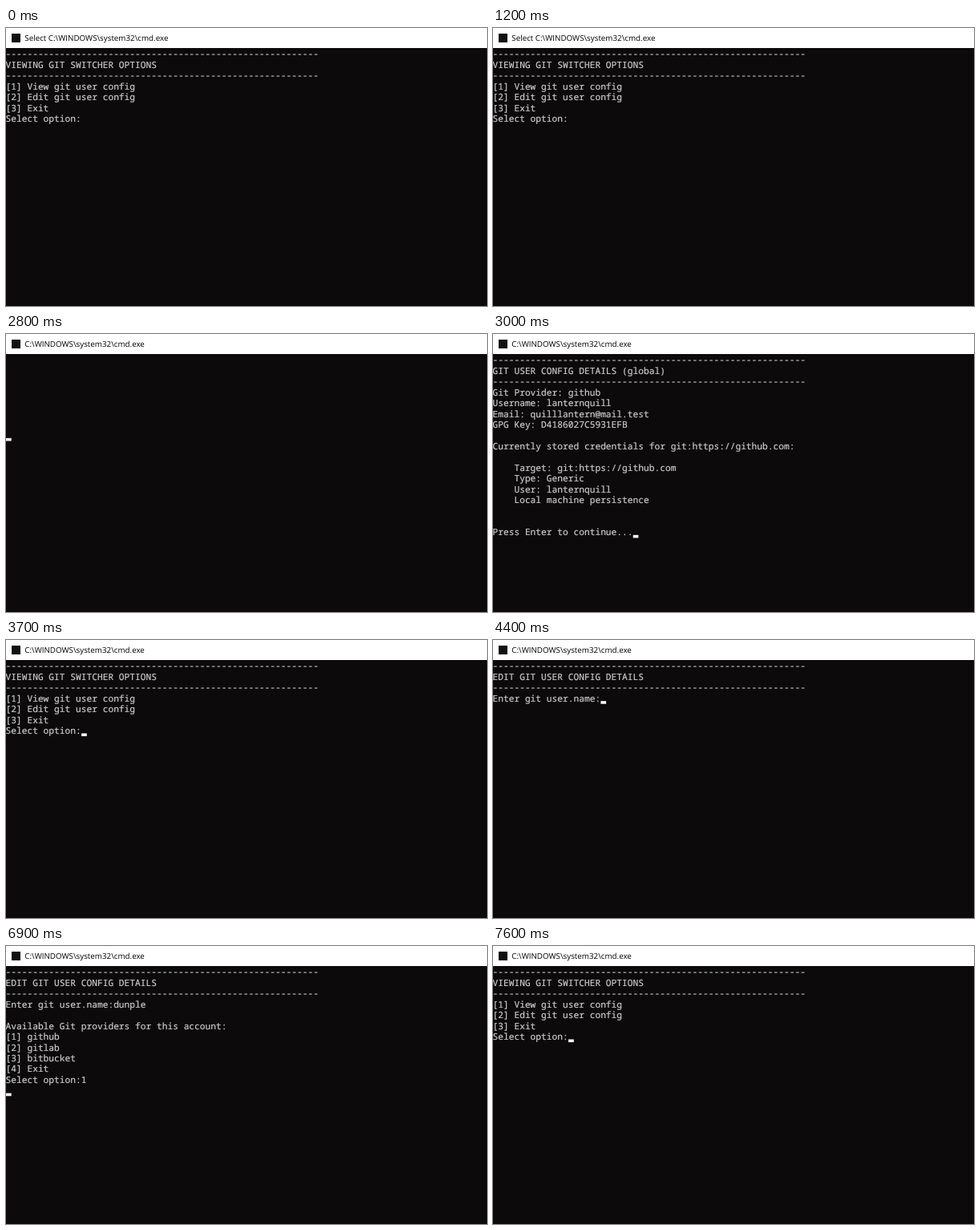
An HTML page for the animation above (8000 ms loop, 600 by 347 pixels).

```html
<!DOCTYPE html>
<html lang="en">
<head>
<meta charset="utf-8">
<title>Git switcher</title>
<style>
  html, body { margin: 0; width: 100%; height: 100%; overflow: hidden; background: #0c0a0b; }
  svg { display: block; width: 100%; height: 100%; }
  text { white-space: pre; text-rendering: geometricPrecision; }
  #title { font: 9.8px "Open Sans", "Noto Sans", sans-serif; fill: #000; }
  #screen {
    font: 11.23px "Noto Sans Mono", "Liberation Mono", monospace;
    fill: #ccc; stroke: #ccc; stroke-width: 0.2;
  }
</style>
</head>
<body>
<svg viewBox="0 0 600 347">
  <rect width="600" height="347" fill="#0c0a0b"/>
  <rect width="600" height="25" fill="#fff"/>
  <rect x="7" y="7" width="11" height="11" fill="#111"/>
  <text id="title" x="23.3" y="16"></text>
  <g id="screen"></g>
  <rect id="cursor" width="6.72" height="3.6" fill="#f8f8f8"/>
</svg>
<script>
const LOOP = 8000, COL = 6.72, ROW = 13.44, TOP = 26, LEFT = -0.5, BASELINE = 10.45;
const $ = id => document.getElementById(id);
const path = "C:\\WINDOWS\\system32\\cmd.exe";
const rule = "-".repeat(58);
const header = name => [rule, name, rule];

const menu = (choice = "") => [
  ...header("VIEWING GIT SWITCHER OPTIONS"),
  "[1] View git user config",
  "[2] Edit git user config",
  "[3] Exit",
  "Select option:" + choice
];

const detailsHeader = header("GIT USER CONFIG DETAILS (global)");
const details = [
  ...detailsHeader,
  "Git Provider: github",
  "Username: lanternquill",
  "Email: quilllantern@mail.test",
  "GPG Key: D4186027C5931EFB",
  "",
  "Currently stored credentials for git:https://github.com:",
  "",
  "    Target: git:https://github.com",
  "    Type: Generic",
  "    User: lanternquill",
  "    Local machine persistence",
  "",
  "",
  "Press Enter to continue..."
];

const userName = "dunple";
const edit = typed => [
  ...header("EDIT GIT USER CONFIG DETAILS"),
  "Enter git user.name:" + userName.slice(0, typed)
];
const providers = (choice = "") => [
  ...edit(userName.length),
  "",
  "Available Git providers for this account:",
  "[1] github",
  "[2] gitlab",
  "[3] bitbucket",
  "[4] Exit",
  "Select option:" + choice
];
const saved = [
  ...providers("1"),
  "Updating the git user config and the stored credentials, please wait",
  "",
  "Press Enter to continue..."
];

// The cursor follows the last line unless it is hidden or given as a row.
const scene = (start, lines, { cursor = true, row, prefix = "" } = {}) =>
  ({ start, lines, cursor, row, prefix });
const hidden = { cursor: false };

const scenes = [
  scene(0, menu(), { cursor: false, prefix: "Select " }),
  scene(1600, menu()),
  scene(1700, menu("1")),
  scene(2100, menu("1"), hidden),
  scene(2700, menu("1"), { row: 7 }),
  scene(2800, [], { row: 7 }),
  scene(2900, detailsHeader, { row: 3 }),
  scene(3000, details),
  scene(3700, menu()),
  scene(4100, menu("2")),
  scene(4300, menu("2"), { row: 7 }),
  scene(4400, edit(0)),
  ...[4500, 4700, 4800, 5000, 5100, 5200].map((t, i) => scene(t, edit(i + 1))),
  scene(5300, edit(6), hidden),
  scene(5900, edit(6)),
  scene(6000, providers()),
  scene(6600, providers("1")),
  scene(6900, providers("1"), { row: 11 }),
  scene(7000, saved),
  scene(7600, menu())
];

function draw({ lines, cursor, row, prefix }) {
  $("title").textContent = prefix + path;
  $("screen").replaceChildren(...lines.map((line, i) => {
    const text = document.createElementNS("http://www.w3.org/2000/svg", "text");
    text.setAttribute("x", LEFT);
    text.setAttribute("y", TOP + ROW * i + BASELINE);
    text.textContent = line;
    return text;
  }));
  const atRow = row ?? lines.length - 1;
  const column = row === undefined ? lines[atRow].length : 0;
  $("cursor").setAttribute("x", column * COL);
  $("cursor").setAttribute("y", TOP + ROW * (atRow + 1) - 3.6);
  $("cursor").setAttribute("visibility", cursor ? "visible" : "hidden");
}

let shown;
function tick() {
  const time = performance.now() % LOOP;
  const current = scenes.findLast(s => s.start <= time);
  if (current !== shown) draw(shown = current);
  requestAnimationFrame(tick);
}
tick();
</script>
</body>
</html>
```
